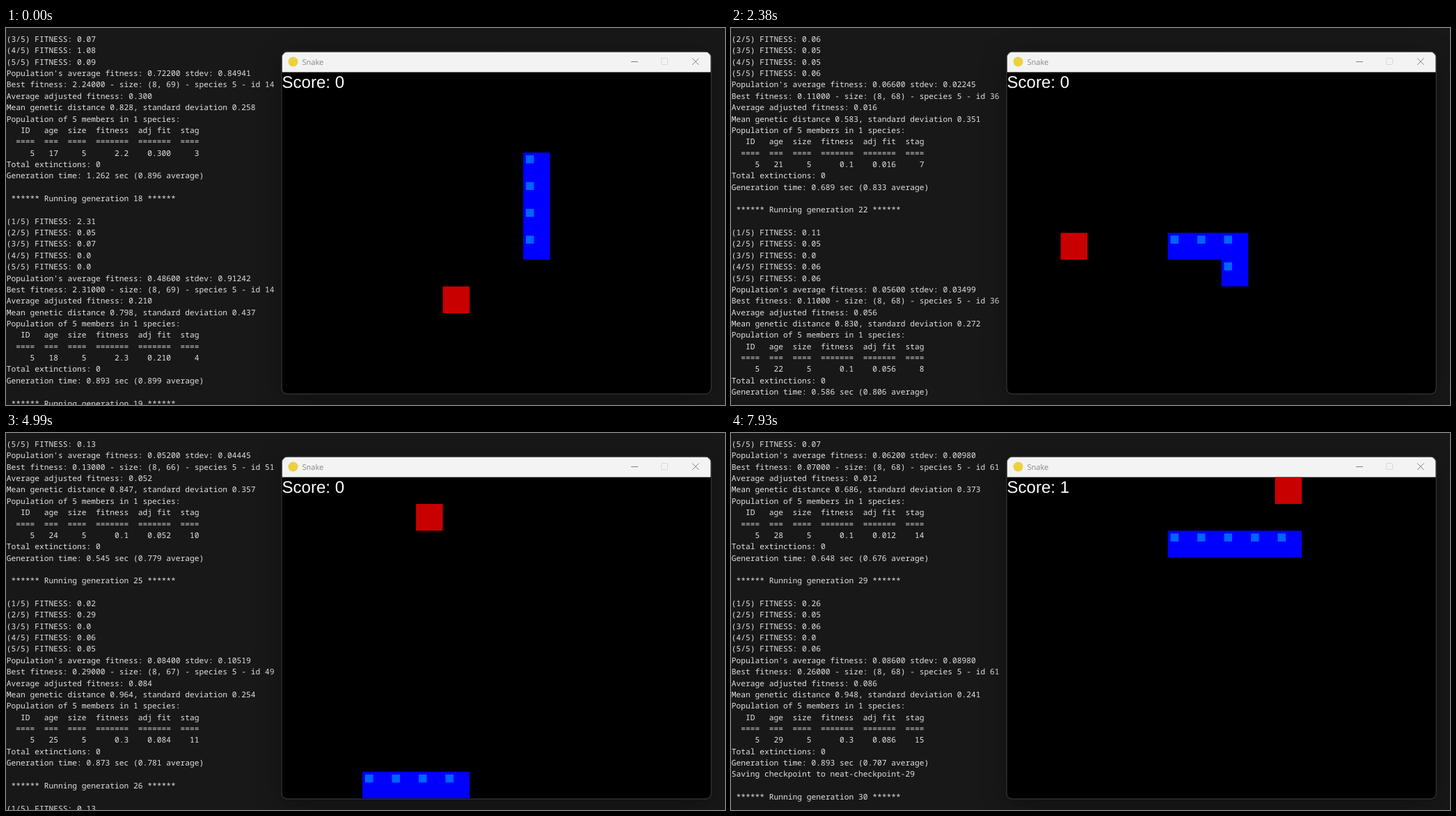
These frames come from a looping animation (1033 px wide and 542 px high, 7.99 s). An HTML page with a canvas:

```html
<!DOCTYPE html>
<html lang="en">
<head>
<meta charset="utf-8">
<title>Snake training</title>
<style>
html, body { margin: 0; width: 100%; height: 100%; overflow: hidden; background: #181818; }
canvas { display: block; }
</style>
</head>
<body>
<canvas id="stage" width="1033" height="542"></canvas>
<script>
const ctx = document.getElementById('stage').getContext('2d');
const LOOP = 7990;
const REFRESH = 60;
const FIRST_GEN = 17;
const CURSOR_ROW = 35;
const WIN = { x: 396.6, y: 34.6, w: 616, h: 491, bar: 29, r: 8 };
const BOARD = { x: WIN.x, y: WIN.y + WIN.bar, cell: 38.5 };
const DIRS = { U: [0, -1], D: [0, 1], L: [-1, 0], R: [1, 0] };

// One line per generation, one word per game: a bare score, or a route with
// optional food cells (@x,y); "-" dies at once. #id/size marks a new champion.
const GENS = `
2.24#14/69 0.13 0.07 1.08 0.09
2.31 0.05 0.07 0 0
D5L8 R1U4R1@6,8 - U1L2 U6@8,3#36/68
D5L8 D5 U6 U6 -
R3U1L3D1L3@1,10 U6 D5 D5 U6
R3U1L3D1L3 D5 - U6 U6
R5D1L5U1L3@2,6 D5 R7 R3U1L3D1L3 D5
- U1L1 D5 U6 D1L8D4@2,10#51/66
U1L1 D5L8U11R5#49/67 - U6 D5
D5L8 U6 - D5L8@5,1 D5L8U5#59/68
- U1L1 D5 U6 -
D5 D5 R7#61/68 R7 R7
U1L8D6R11@3,9 D5 U6 - U6
- D5 D5L8U9R10@3,2@10,0`.trim().split('\n').map(line => line.split(' '));

const lines = [];
const moments = [];
const genTimes = Array(9).fill(0.855);
let champion = [];
let clock = 0;
let seed = 7;

function random(min, max) {
  seed = (seed * 1103515245 + 12345) % 2147483648;
  return min + (max - min) * seed / 2147483648;
}

const same = (a, b) => a[0] === b[0] && a[1] === b[1];
const sum = list => list.reduce((a, b) => a + b, 0);
const mean = list => sum(list) / list.length;

function walk(route) {
  const cells = [];
  let [x, y] = [8, 6];
  for (const [, dir, n] of route.matchAll(/([UDLR])(\d+)/g)) {
    for (let i = 0; i < n; i++) {
      x += DIRS[dir][0];
      y += DIRS[dir][1];
      cells.push([x, y]);
    }
  }
  return cells;
}

function freeFood(path) {
  let food;
  do food = [Math.floor(random(0, 13)), Math.floor(random(0, 12))];
  while (food[1] === 6 || path.some(p => same(p, food)));
  return food;
}

function play(word, id) {
  if (/^\d/.test(word)) return parseFloat(word);
  const [route, ...foods] = word.split('#')[0].split('@');
  const path = walk(route);
  const queue = foods.map(f => f.split(',').map(Number));
  let food = queue.shift() || freeFood(path);
  let snake = [[8, 6], [7, 6], [6, 6], [5, 6]];
  let score = 0;
  path.forEach((head, i) => {
    snake = [head, ...snake];
    if (same(head, food)) {
      score++;
      food = queue.shift() || freeFood(path);
    } else {
      snake.pop();
    }
    moments.push({ id: `${id}.${i + 1}`, clock, snake, food, score, count: lines.length });
    clock++;
  });
  return path.length / 100 + score;
}

function showDeath() {
  if (!moments.length) return;
  moments.push({ ...moments[moments.length - 1], id: '', clock, count: lines.length });
  clock += 0.15;
}

function report(gen, fits) {
  const avg = mean(fits);
  const stdev = Math.sqrt(mean(fits.map(f => (f - avg) ** 2)));
  const best = Math.max(...fits);
  const worst = Math.min(...fits);
  const adjusted = ((avg - worst) / Math.max(1, best - worst)).toFixed(3);
  const steps = sum(fits.map(f => f % 1 * 100));
  genTimes.push(0.013 + 0.02047 * steps);
  const [id, size] = champion;
  lines.push(
    `Population's average fitness: ${avg.toFixed(5)} stdev: ${stdev.toFixed(5)}`,
    `Best fitness: ${best.toFixed(5)} - size: (8, ${size}) - species 5 - id ${id}`,
    `Average adjusted fitness: ${adjusted}`,
    `Mean genetic distance ${random(0.5, 1.05).toFixed(3)}, standard deviation ${random(0.18, 0.44).toFixed(3)}`,
    'Population of 5 members in 1 species:',
    '   ID   age  size  fitness  adj fit  stag',
    '  ====  ===  ====  =======  =======  ====',
    `     5   ${gen}     5${best.toFixed(1).padStart(9)}${adjusted.padStart(9)}${String(gen - 14).padStart(6)}`,
    'Total extinctions: 0',
    `Generation time: ${genTimes.at(-1).toFixed(3)} sec (${mean(genTimes.slice(-10)).toFixed(3)} average)`
  );
  if (gen % 10 === 9) lines.push(`Saving checkpoint to neat-checkpoint-${gen}`);
}

GENS.forEach((games, g) => {
  const gen = FIRST_GEN + g;
  lines.push('', ` ****** Running generation ${gen} ****** `, '');
  const fits = games.map((word, i) => {
    const fit = play(word, `${gen}.${i + 1}`);
    if (word.includes('#')) champion = word.split('#')[1].split('/');
    lines.push(`(${i + 1}/5) FITNESS: ${fit ? Number(fit.toFixed(2)) : '0.0'}`);
    if (i < 4) showDeath();
    return fit;
  });
  if (games.length === 5) report(gen, fits);
});

// Key poses: time and generation.game.step, with steady play in between.
const refreshAt = ms => Math.floor(ms / REFRESH);
const keys = [[0, '19.2.4'], [1090, '21.1.10'], [2380, '23.1.14'], [3340, '24.5.5'],
  [4990, '26.4.10'], [6550, '29.1.13'], [7930, '30.3.32']]
  .map(([ms, id]) => [refreshAt(ms), moments.find(m => m.id === id).clock + 0.05]);

function momentAt(tick) {
  let i = 0;
  while (i < keys.length - 2 && tick >= keys[i + 1][0]) i++;
  const [[t0, c0], [t1, c1]] = [keys[i], keys[i + 1]];
  const now = c0 + (c1 - c0) * Math.min(1, (tick - t0) / (t1 - t0));
  return moments.findLast(m => m.clock <= now);
}

function text(str, x, y, font, color) {
  ctx.font = font;
  ctx.fillStyle = color;
  ctx.fillText(str, x, y);
}

function fill(color, build) {
  ctx.fillStyle = color;
  ctx.beginPath();
  build();
  ctx.fill();
}

function stroke(color, build) {
  ctx.strokeStyle = color;
  ctx.lineWidth = 1;
  ctx.beginPath();
  build();
  ctx.stroke();
}

// Adds squares of one size, inset from their cells' corners, to the path.
function squares(cells, inset, size) {
  for (const [c, r] of cells) {
    ctx.rect(BOARD.x + c * BOARD.cell + inset, BOARD.y + r * BOARD.cell + inset, size, size);
  }
}

function windowShape(grow = 0) {
  ctx.roundRect(WIN.x - grow, WIN.y - grow, WIN.w + 2 * grow, WIN.h + 2 * grow, WIN.r);
}

function drawLog(count) {
  lines.slice(count - CURSOR_ROW, count).forEach((line, row) => {
    text(line, 0.7, 20 + row * 16.36, '500 11.25px "Noto Sans Mono", monospace', '#e2e2e2');
  });
}

function drawTitleBar() {
  fill('#f3f3f3', () => ctx.rect(WIN.x, WIN.y, WIN.w, WIN.bar));
  fill('#ecd13f', () => ctx.arc(412.5, 48.5, 7, 0, Math.PI * 2));
  text('Snake', 425.5, 53, '11px "Open Sans", sans-serif', '#858585');
  stroke('#828282', () => {
    ctx.moveTo(898, 48.5);
    ctx.lineTo(908, 48.5);
    ctx.moveTo(986, 43.5);
    ctx.lineTo(995.5, 53);
    ctx.moveTo(995.5, 43.5);
    ctx.lineTo(986, 53);
  });
  stroke('#d8d8d8', () => ctx.roundRect(941.5, 43.5, 9, 9, 1));
}

function drawBoard({ snake, food, score }) {
  fill('#00f', () => squares(snake, 0, BOARD.cell));
  fill('#0064ff', () => squares(snake, 3.85, 11.55));
  fill('#c80000', () => squares([food], 0, BOARD.cell));
  text(`Score: ${score}`, BOARD.x, 86, '24px "Liberation Sans", Arial, sans-serif', '#fff');
}

function draw(moment) {
  fill('#181818', () => ctx.rect(0, 0, 1033, 542));
  drawLog(moment.count);

  ctx.save();
  ctx.shadowColor = 'rgba(0,0,0,0.35)';
  ctx.shadowBlur = 36;
  ctx.shadowOffsetY = 8;
  fill('#000', () => windowShape());
  ctx.restore();

  stroke('#444', () => windowShape(0.5));
  ctx.save();
  ctx.beginPath();
  windowShape();
  ctx.clip();
  fill('#000', () => ctx.rect(WIN.x, WIN.y, WIN.w, WIN.h));
  drawTitleBar();
  drawBoard(moment);
  ctx.restore();
}

let shown = -1;
function frame() {
  const tick = refreshAt(performance.now() % LOOP);
  if (tick !== shown) {
    shown = tick;
    draw(momentAt(tick));
  }
  requestAnimationFrame(frame);
}

ctx.textRendering = 'geometricPrecision';
frame();
</script>
</body>
</html>
```
